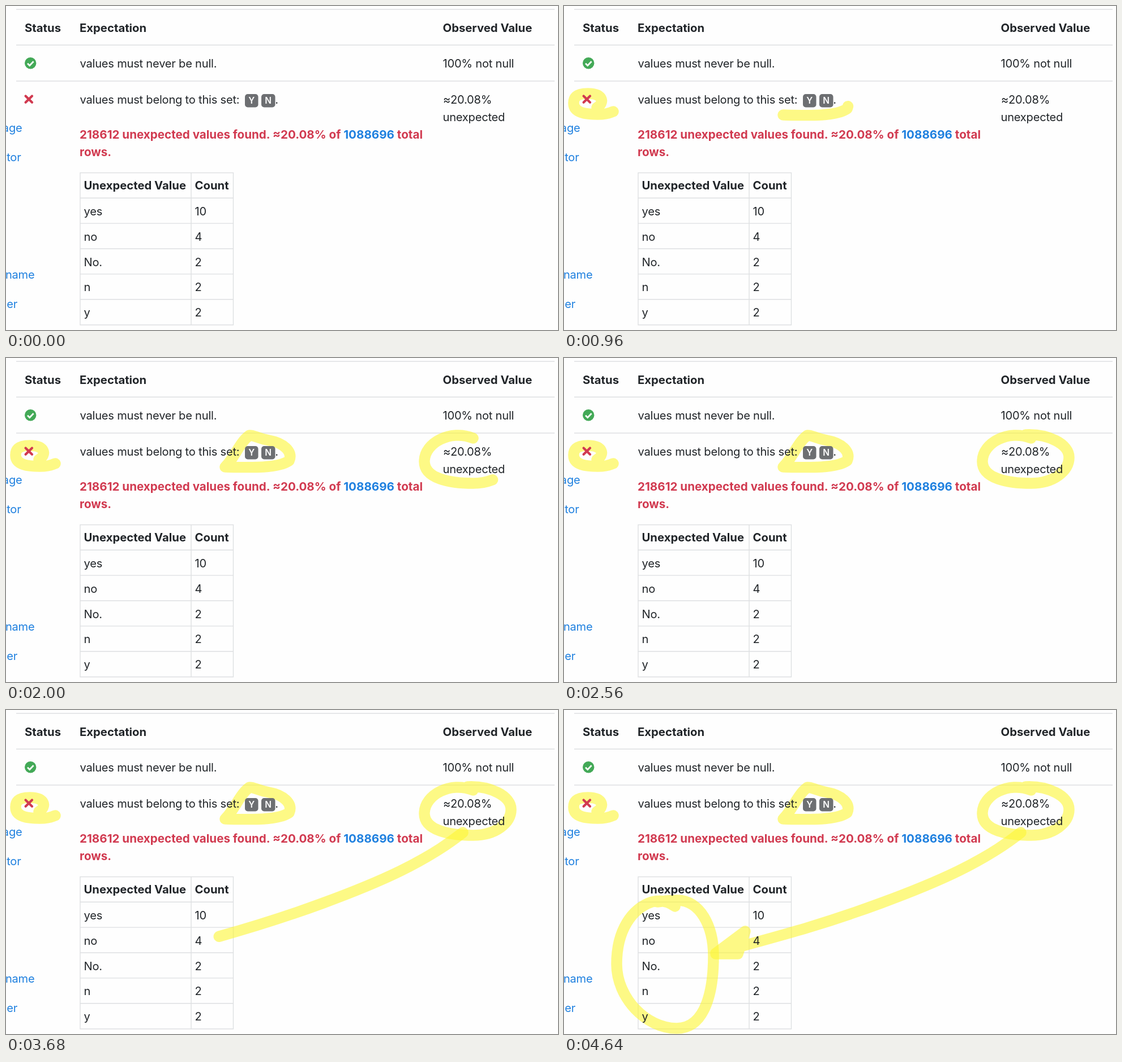
Animation, 975 px wide and 574 px high, one loop 4740 ms. Source, as an HTML page:

```html
<!DOCTYPE html>
<html lang="en">
<head>
<meta charset="utf-8">
<title>Validation results</title>
<style>
html, body { margin: 0; width: 100%; height: 100%; overflow: hidden; background: #fefefe; }
svg { display: block; width: 975px; height: 574px; }
text { font: 400 20.1px Inter, "Open Sans", sans-serif; font-optical-sizing: none; letter-spacing: -.22px; fill: #212529; }
.bold text { font-weight: 700; font-size: 20.3px; letter-spacing: 0; }
.bold .red { font-size: 20.6px; }
.red { fill: #d13a50; }
.blue, .side text { fill: #1f80df; }
.side text { text-anchor: end; }
.badge text { font-weight: 600; font-size: 15.4px; letter-spacing: 0; fill: #fff; text-anchor: middle; }
#rules { fill: none; stroke: #dee0e2; stroke-width: 1.4; }
#marker path { fill: none; stroke: #fdf630; stroke-opacity: .58; stroke-width: 19.5; stroke-linecap: round; stroke-linejoin: round; }
</style>
</head>
<body>
<svg viewBox="0 0 975 574">
  <path id="rules" d="M18 6H969M18 69.2H969M18 133H969M131 295.5H401.5V565H131ZM327 295.5V565"/>
  <g id="marker"></g>

  <circle cx="43.2" cy="101.2" r="10.2" fill="#43a957"/>
  <path d="M38 101.8L41.7 105.4L48.6 98.2" fill="none" stroke="#fff" stroke-width="2.8"/>
  <path d="M34.6 159.4L46 170.8M46 159.4L34.6 170.8" stroke="#d13a50" stroke-width="4.2" stroke-linecap="round"/>

  <g class="bold">
    <text x="33" y="46">Status</text>
    <text x="130" y="46">Expectation</text>
    <text x="771.5" y="46">Observed Value</text>
    <text x="130" y="235" class="red">218612 unexpected values found. ≈20.08% of <tspan class="blue">1088696</tspan> total</text>
    <text x="130" y="266" class="red">rows.</text>
    <text x="137.5" y="325">Unexpected Value</text>
    <text x="333.5" y="325">Count</text>
  </g>
  <text x="130.5" y="109">values must never be null.</text>
  <text x="771.5" y="109">100% not null</text>
  <text x="130.5" y="173">values must belong to this set:</text>
  <text x="475.2" y="173">.</text>
  <text x="772" y="173">≈20.08%</text>
  <text x="771.5" y="204">unexpected</text>
  <g class="badge">
    <rect x="422" y="156" width="23.5" height="23.5" rx="5" fill="#6d6f72"/>
    <rect x="451" y="156" width="24.5" height="23.5" rx="5" fill="#6d6f72"/>
    <text x="433.7" y="173.3">Y</text>
    <text x="463.2" y="173.3">N</text>
  </g>
  <g class="side">
    <text x="28.5" y="223">age</text>
    <text x="26.5" y="275">tor</text>
    <text x="50.5" y="483">name</text>
    <text x="20" y="535">er</text>
  </g>
  <g id="rows"></g>
</svg>
<script>
const LOOP = 4740, STEP = 80, ROW = 44.9;
const $ = id => document.getElementById(id);

function add(parent, tag, attrs, str = "") {
  const el = document.createElementNS("http://www.w3.org/2000/svg", tag);
  for (const k in attrs) el.setAttribute(k, attrs[k]);
  el.textContent = str;
  $(parent).append(el);
  return el;
}

let lines = $("rules").getAttribute("d");
Object.entries({ yes: 10, no: 4, "No.": 2, n: 2, y: 2 }).forEach(([value, count], i) => {
  const y = 370.7 + i * ROW;
  add("rows", "text", { x: 137.5, y }, value);
  add("rows", "text", { x: 333.5, y }, count);
  lines += `M131 ${340.2 + i * ROW}H401.5`;
});
$("rules").setAttribute("d", lines);

// Marker strokes, each drawn at constant speed between two times.
function stroke(from, to, d) {
  return { from, to, el: add("marker", "path", { d, pathLength: 1 }) };
}

const strokes = [
  // around the cross
  stroke(80, 640, "M58 180C72 172 70 155 42 155C20 155 17 164 17 172C17 190 40 192 60 192S80 189 87 187"),
  // around the badges
  stroke(720, 1280, "M387 193C430 194 480 196 500 182C508 165 488 150 465 146S440 137 430 137C412 150 405 175 388 192"),
  // around the observed value
  stroke(1600, 2240, "M825 142C785 126 740 150 739 182S785 222 825 222S892 200 892 176S855 134 815 136"),
  // arrow to the table
  stroke(3360, 3880, "M807 217C740 270 660 305 560 342S400 395 268 431L320 392L307 432H268L300 415"),
  // around the values
  stroke(4200, 4640, "M196 348C186 340 172 336 155 340C120 352 93 390 93 450S145 564 199 564S264 490 264 436S240 337 200 337Q185 337 165 340")
];

function draw(now) {
  const t = Math.floor((now % LOOP) / STEP) * STEP;
  for (const { from, to, el } of strokes) {
    const p = Math.max(0, Math.min(1, (t - from) / (to - from)));
    el.style.display = p ? "" : "none";
    el.setAttribute("stroke-dasharray", p < 1 ? `${p} 2` : "none");
  }
}

let start;
function tick(now) {
  start ??= now;
  draw(now - start);
  requestAnimationFrame(tick);
}
draw(0);
requestAnimationFrame(tick);
</script>
</body>
</html>
```
